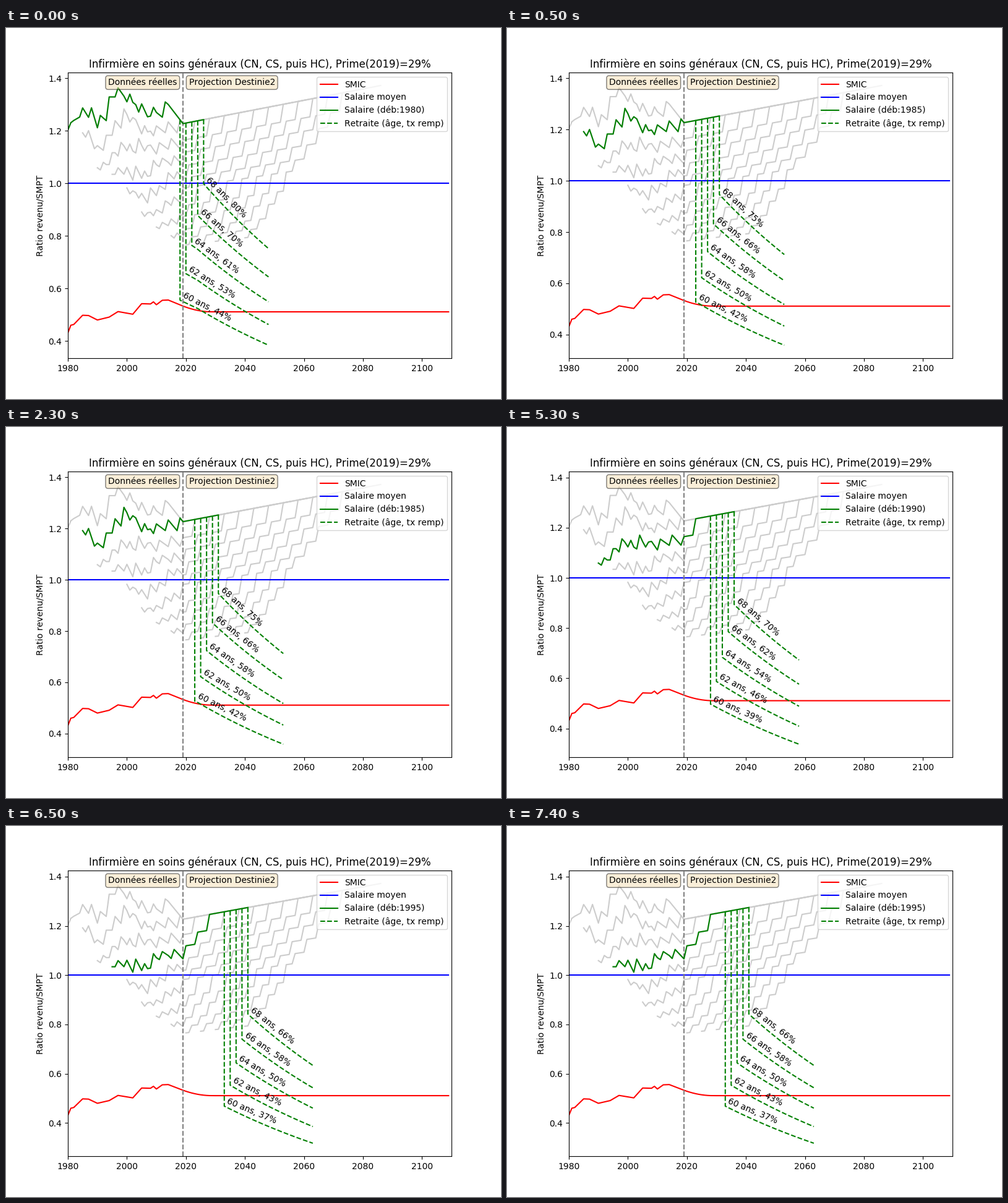
A matplotlib script that plays this animation: 800 by 600 pixels, repeating every 8000 ms.

```python
import math

import matplotlib.pyplot as plt
import numpy as np
from matplotlib.animation import FuncAnimation

plt.rcParams["text.kerning_factor"] = 6

FIRST, NOW, LAST = 1980, 2019, 2109
ENTRY_AGE, FINAL_AGE, DEATH_AGE = 22, 68, 90
AGES = range(60, FINAL_AGE + 1, 2)

# Years of service at which each pay step begins, and its pay index
STEP_YEARS = [0, *range(2, 18, 3), *range(21, 34, 4)]
STEP_INDEX = np.array([390, 404, 421, 446, 467, 501, 520, 544, 570, 594, 626])

# Turning points of the top step's pay and of the minimum wage, over the mean wage
TOP_PAY = [(1980, 1.93), (1981, 1.975), (1982, 1.92), (1984, 1.94),
           (1987, 1.86), (1990, 1.70), (1993, 1.66), (1996, 1.66),
           (1999, 1.603), (2000, 1.577), (2002, 1.505), (2003, 1.495),
           (2005, 1.43), (2007, 1.376), (2008, 1.379), (2010, 1.338),
           (2014, 1.30), (2019, 1.227), (2086, 1.372)]
SMIC = [(1980, 0.431), (1981, 0.46), (1982, 0.463), (1985, 0.498),
        (1987, 0.497), (1990, 0.48), (1994, 0.491), (1997, 0.512),
        (2002, 0.502), (2005, 0.542), (2008, 0.541), (2009, 0.549),
        (2010, 0.538), (2012, 0.555), (2014, 0.556), (2019, 0.533)]


def follow(points, years):
    return np.interp(years, *zip(*points))


def career(start):
    service = np.arange(FINAL_AGE - ENTRY_AGE + 1)
    step = np.searchsorted(STEP_YEARS, service, side="right") - 1
    years = start + service
    return years, follow(TOP_PAY, years) * STEP_INDEX[step] / STEP_INDEX[-1]


def smic():
    years = np.arange(FIRST, LAST + 1)
    fall = 1 - np.clip((2029 - years) / (2029 - NOW), 0, 1) ** 2
    return years, follow(SMIC, years) - 0.022 * fall


def pension(start, age):
    """Later exits raise the first pension, which then lags behind wages."""
    years = np.arange(start + age - ENTRY_AGE, start + DEATH_AGE - ENTRY_AGE + 1)
    late = age - 60
    first = 0.5555 - 0.0058 * (start - FIRST)
    first *= 1 + 0.0877 * late + 0.0015 * late**2
    rates = np.where(years[:-1] < 2024, 0.9902, 0.98717)
    return years, first * np.append(1, np.cumprod(rates))


careers = {start: career(start) for start in range(FIRST, 2041, 5)}
highest = max(pay.max() for _, pay in careers.values())

fig, ax = plt.subplots(figsize=(8, 6), dpi=100)


def note(x, text, align):
    ax.text(x, 0.98, text, ha=align, va="top",
            transform=ax.get_xaxis_transform(),
            bbox=dict(boxstyle="round", facecolor="wheat", alpha=0.5))


def draw_pension(start, age, years, income):
    salary = careers[start][1][years[0] - start]
    ax.plot(np.append(years[0], years), np.append(salary, income), "--",
            color="green", label="Retraite (âge, tx remp)" if age == 60 else None)
    ends = ax.transData.transform([(years[0], income[0]), (years[-1], income[-1])])
    dx, dy = ends[1] - ends[0]
    ax.text(years[0] + 0.7, income[0] + 0.012,
            f"{age} ans, {int(100 * income[0] / salary)}%",
            rotation=math.degrees(math.atan2(dy, dx)), rotation_mode="anchor")


def draw(i):
    start = FIRST + 5 * ((i + 5) // 6)
    pensions = {age: pension(start, age) for age in AGES}
    lowest = min(income.min() for _, income in pensions.values())
    pad = 0.05 * (highest - lowest)

    ax.clear()
    ax.set_xlim(FIRST, 2110)
    ax.set_ylim(lowest - pad, highest + pad)
    ax.set_title("Infirmière en soins généraux (CN, CS, puis HC), Prime(2019)=29%")
    ax.set_ylabel("Ratio revenu/SMPT")

    for years, pay in careers.values():
        ax.plot(years, pay, color="0.8")
    ax.plot(*smic(), color="red", label="SMIC")
    ax.plot([FIRST, LAST], [1, 1], color="blue", label="Salaire moyen")
    ax.axvline(NOW, color="grey", linestyle="--")
    ax.plot(*careers[start], color="green", label=f"Salaire (déb:{start})")
    for age, curve in pensions.items():
        draw_pension(start, age, *curve)

    note(2017, "Données réelles", "right")
    note(2021, "Projection Destinie2", "left")
    ax.legend(loc="upper right")
    return []


anim = FuncAnimation(fig, draw, frames=16, interval=500, repeat=True,
                     repeat_delay=0)
plt.show()
```
